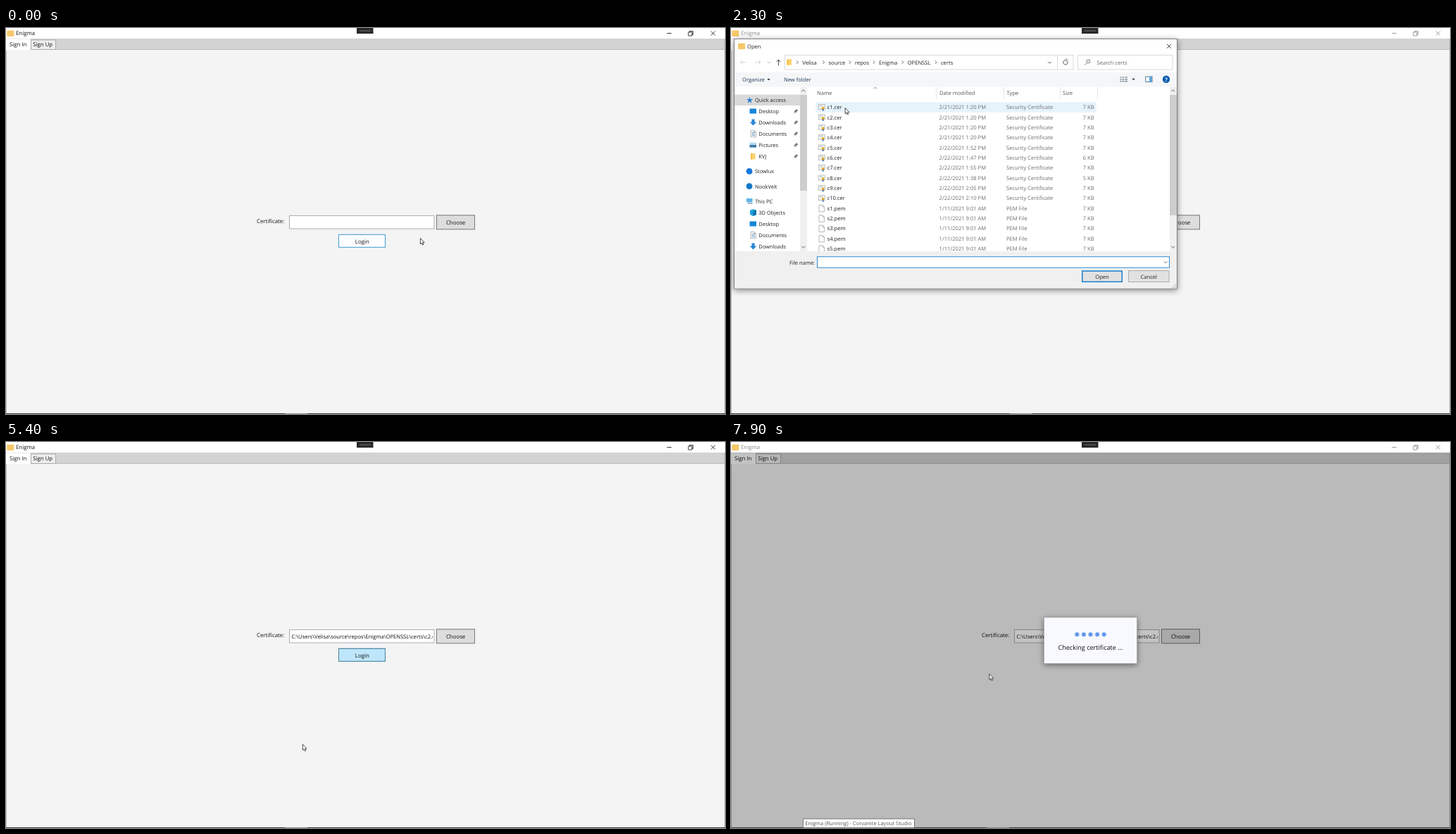
These frames come from a looping animation (1021x548 px, 8000 ms). An HTML page:

```html
<!DOCTYPE html>
<html lang="en">
<head>
<meta charset="utf-8">
<title>Enigma</title>
<style>
html, body { margin: 0; width: 100%; height: 100%; overflow: hidden; background: #f4f4f4; }
svg { display: block; width: 1021px; height: 548px; }
text { font: 7.6px 'Open Sans', 'Noto Sans', sans-serif; text-rendering: geometricPrecision; white-space: pre; fill: #222; }
.app text { font-size: 7.85px; font-weight: 500; fill: #111; }
.line { fill: none; stroke: #222; stroke-width: .9; }
.shadow { filter: drop-shadow(0 2px 4px #0007); }

.caption, .chooseHot, .dialog, .blank, .shell, .content, .hover, .picked, .path, .loginHot, .busy, .tip, .dots, .cursor, .active {
  animation: 8s step-end infinite;
}
.caption { animation-name: caption; }
.chooseHot { animation-name: chooseHot; }
.dialog { animation-name: dialog; }
.blank { animation-name: blank; }
.shell { animation-name: shell; }
.content { animation-name: content; }
.hover { animation-name: hover; }
.picked { animation-name: picked; }
.path { animation-name: path; }
.loginHot { animation-name: loginHot; }
.busy { animation-name: busy; }
.tip { animation-name: tip; }
.active { animation-name: active; }
.dots { animation-name: dots; fill: none; stroke: #5f97ea; stroke-width: 6; stroke-linecap: round; }
.cursor { animation-name: cursor; animation-timing-function: linear; }

@keyframes caption { 0% { opacity: 1 } 10.5% { opacity: .5 } 50% { opacity: 1 } 77.4% { opacity: .5 } }
@keyframes chooseHot { 0% { opacity: 0 } 3.7% { opacity: 1 } 12.4% { opacity: 0 } }
@keyframes dialog { 0% { opacity: 0 } 12.4% { opacity: 1 } 50% { opacity: 0 } }
@keyframes blank { 0% { opacity: 1 } 21.2% { opacity: 0 } }
@keyframes shell { 0% { opacity: 0 } 21.2% { opacity: 1 } }
@keyframes content { 0% { opacity: 0 } 23.7% { opacity: 1 } }
@keyframes hover { 0% { opacity: 0 } 26.2% { opacity: 1 } 35% { opacity: 0 } }
@keyframes picked { 0% { opacity: 0 } 38.7% { opacity: 1 } }
@keyframes path { 0% { opacity: 0 } 50% { opacity: 1 } }
@keyframes loginHot { 0% { opacity: 0 } 60% { opacity: 1 } 68.5% { opacity: 0 } }
@keyframes busy { 0% { opacity: 0 } 68.5% { opacity: 1 } }
@keyframes tip { 0% { opacity: 0 } 83.7% { opacity: 1 } }
@keyframes active { 0% { transform: none } 77.4% { transform: translateX(-33px) } }
@keyframes dots {
  0% { transform: translateX(0); stroke-dasharray: 0 99 }
  74.8% { transform: translateX(-4.8px); stroke-dasharray: 0 9.6 0 99 }
  81% { transform: translateX(-9.6px); stroke-dasharray: 0 9.6 0 9.6 0 99 }
  87.3% { transform: translateX(-14.4px); stroke-dasharray: 0 9.6 0 9.6 0 9.6 0 99 }
  93.5% { transform: translateX(-19.2px); stroke-dasharray: 0 9.6 }
}
@keyframes cursor {
  0%, 1.25% { transform: translate(588px, 298px) }
  6.25% { transform: translate(636px, 274px) }
  12.5% { transform: translate(637px, 274px) }
  17.5% { transform: translate(440.7px, 233px) }
  23.75% { transform: translate(210px, 135px) }
  28.75% { transform: translate(161.7px, 113px) }
  33.75% { transform: translate(160px, 115px) }
  38.75%, 48.75% { transform: translate(151.5px, 125px) }
  56.25% { transform: translate(364px, 274px) }
  58.75% { transform: translate(600px, 296px) }
  61.25% { transform: translate(512px, 300px) }
  63.75% { transform: translate(506px, 302px) }
  67.5% { transform: translate(422px, 428px) }
  68.75% { transform: translate(305.2px, 499px) }
  73.75% { transform: translate(185px, 552px) }
  93.75% { transform: translate(181px, 552px) }
  98.75%, 100% { transform: translate(366.5px, 328.7px) }
}
</style>
</head>
<body>
<svg id="stage" viewBox="0 0 1021 548"></svg>
<script>
const rect = (x, y, w, h, fill, more = '') =>
  `<rect x="${x}" y="${y}" width="${w}" height="${h}" fill="${fill}" ${more}/>`;
const box = (x, y, w, h, fill, edge, weight = 1) =>
  rect(x, y, w, h, fill, `stroke="${edge}" stroke-width="${weight}"`);
const line = (d, color = '#222', weight = .9) =>
  `<path class="line" d="${d}" style="stroke:${color};stroke-width:${weight}"/>`;
const disc = (x, y, r, fill) => `<circle cx="${x}" cy="${y}" r="${r}" fill="${fill}"/>`;
// y is the middle of the capitals
const text = (x, y, s, style = '', anchor = 'start') =>
  `<text x="${x}" y="${y + 2.8}" text-anchor="${anchor}" style="${style}">${s}</text>`;
const group = (name, ...parts) => `<g class="${name}">${parts.join('')}</g>`;
const list = (items, draw) => items.map(draw).join('');
const chevron = (x, y, dx, dy, color = '#555') => dx
  ? line(`M${x - dx / 2} ${y - 2.2}l${dx} 2.2l${-dx} 2.2`, color)
  : line(`M${x - 2.4} ${y - dy / 2}l2.4 ${dy}l2.4 ${-dy}`, color);
const arrowDown = (x, y) => `<path d="M${x - 2.2} ${y - 1}h4.4l-2.2 2.4z" fill="#333"/>`;
const cross = (x, y) => line(`M${x - 3} ${y - 3}l6 6m0-6l-6 6`);
const page = (x, y) =>
  line(`M${x} ${y - 4.6}h5l2.4 2.4v7h-7.4zm5 0v2.4h2.4`, '#999', .7);
const folder = (x, y) => rect(x, y - 4, 6.5, 8.5, '#ffd56f') + rect(x, y - 4, 2, 8.5, '#f3bd4a');
const pin = (x, y) => `<path d="M${x + .5} ${y - 3.5}l3 3l-1.2.3l-1.7 1.7l-.2 1.6l-1.4-1.4l-2.5 2.5l2-3l-1.4-1.4l1.6-.2l1.7-1.7z" fill="#777"/>`;
const appIcon = (x, y) => rect(x, y, 10, 8.4, '#f5c868');

// main window
const caption = group('caption',
  text(14, 7.6, 'Enigma'),
  line('M938.5 7.5h6.5'),
  line('M969 6h5v5h-5zM970.5 6v-1.5h5v5h-1.5'),
  cross(1004, 7.5));

const app = group('app',
  rect(0, 0, 1021, 548, '#f4f4f4'),
  rect(0, 0, 1021, 15, '#fff'),
  rect(0, 15, 1021, 15.5, '#d3d3d3'),
  line('M.5 15V548M1020.5 15V548M0 30.5H1021', '#b5b5b5', .9),
  rect(0, 15.5, 35, 16, '#fff'),
  box(35.5, 17, 35, 13.5, '#eee', '#acacac'),
  text(5, 23.2, 'Sign In'), text(38.2, 23.6, 'Sign Up'),
  appIcon(1.3, 3.5), caption,
  rect(498, 0, 23.5, 8, '#282828'), rect(502, 3, 16, 2, '#4c4c4c'),
  text(356, 274.6, 'Certificate:'),
  box(402.5, 266.5, 205.5, 18.5, '#fff', '#abadb3'),
  `<clipPath id="field"><rect x="403" y="267" width="203" height="18"/></clipPath>`,
  group('path', `<g clip-path="url(#field)">${text(405.5, 276, 'C:\\Users\\Velisa\\source\\repos\\Enigma\\OPENSSL\\certs\\c2.cer', 'font-size:7.6px')}</g>`),
  box(611.5, 265.8, 54, 20, '#ddd', '#777'),
  group('chooseHot', box(611.5, 265.8, 54, 20, '#bee6fd', '#3c7fb1')),
  text(638.6, 276.2, 'Choose', '', 'middle'),
  box(472.5, 293.3, 66, 18, '#fff', '#3d98cf'),
  group('loginHot', box(472.5, 293.3, 66, 18, '#bee6fb', '#4a8099')),
  text(505.8, 302.8, 'Login', '', 'middle'));

// file dialog
const navRows = ['Desktop', 'Downloads', 'Documents', 'Pictures', 'KVJ'];
const navY = i => 118 + 16 * i;
const blue = '#2b83d6';
const navIcon = {
  Desktop: y => rect(26.5, y - 3.5, 9.5, 7, '#1687d9'),
  Downloads: y => `<path d="M29.5 ${y - 4.5}h4v4h2.8l-4.8 5l-4.8-5h2.8z" fill="${blue}"/>`,
  Documents: y => page(28, y) + line(`M29.5 ${y - 1.5}h4.5m-4.5 2h4.5m-4.5 2h4.5`, '#4c86b5', .8),
  Pictures: y => rect(26.5, y - 3.5, 9.5, 7, '#b9d9ee') + rect(26.5, y, 9.5, 3.5, '#3c78a6'),
  '3D Objects': y => `<path d="M27 ${y - 3.5}l4.5-1.2l4.5 1.2v6.5l-4.5 2l-4.5-2z" fill="#23a3dc"/><path d="M31.5 ${y - 2}l4.5-1.5v6.5l-4.5 2z" fill="#1173ad"/>`,
  KVJ: y => folder(28, y),
};
const navItem = (s, y) => navIcon[s](y) + text(39.3, y, s, 'font-size:7.45px');

const blank = group('blank',
  rect(5, 94.5, 103.5, 15.5, '#d9d9d9'),
  list(navRows, (s, i) => page(28, navY(i)) + pin(103, navY(i)) + text(39.3, navY(i), s, 'font-size:7.45px')),
  text(34, 267.3, 'Network', 'font-size:7.45px'),
  rect(623, 95, 10, 171, '#cdcdcd'), rect(623, 266, 10, 39, '#f0f0f0'),
  rect(5, 317, 628, 52.5, '#f0f0f0'),
  rect(623, 358, 10, 11.5, '#fff'),
  rect(83, 327, 36.5, 10.5, '#fff'), rect(122.5, 324.5, 500, 16, '#fff'),
  rect(498, 344, 58.5, 17.5, '#fff'), rect(564, 344, 58.5, 17.5, '#fff'));

const grip = list([0, 1, 2, 3, 4, 5], i => {
  const [c, r] = [[2, 0], [1, 1], [2, 1], [0, 2], [1, 2], [2, 2]][i];
  return rect(626.5 + 2.2 * c, 363.3 + 2.2 * r, 1.2, 1.2, '#aaa');
});
const scrollbar = (x, end) =>
  rect(x, 84, 10, 233, '#f0f0f0') + rect(x, 95, 10, end - 95, '#cdcdcd') +
  chevron(x + 4.8, 89, 0, -2.6) + chevron(x + 4.8, 311, 0, 2.6);

const shell = group('shell',
  rect(5, 94.5, 93, 15.5, '#d9d9d9'),
  rect(5, 63, 628, 20.5, '#f5f6f7'),
  scrollbar(98, 231), scrollbar(623, 266),
  rect(5, 317, 628, 52.5, '#f0f0f0'), grip);

const crumbs = [['Velisa', 101.3], ['source', 138.5], ['repos', 176], ['Enigma', 210], ['OPENSSL', 250.7], ['certs', 298]];
const navy = 'fill:#1e395b';
const toolbar =
  line('M21.5 48.8h-8m3.2-3l-3.2 3l3.2 3M34 48.8h8m-3.2-3l3.2 3l-3.2 3', '#ccc') +
  chevron(54, 49, 0, 1.8, '#bbb') +
  line('M67.5 53v-8m-2.8 3l2.8-3l2.8 3', '#444', 1) +
  box(76.5, 38.5, 409.5, 20.5, '#fff', '#d9d9d9') + line('M463.5 38.5v20.5', '#d9d9d9') +
  folder(79.5, 48.3) +
  list(crumbs, ([s, x]) => chevron(x - 7, 48.6, 2.2, 0) + text(x, 48.8, s)) +
  chevron(452.5, 49, 0, 2.6) +
  line('M477.8 47.2a3.2 3.2 0 1 1-2.5-1.6M475 43.7l2.6 1.8l-2 2.2', '#444') +
  box(492.5, 38.5, 134.5, 20.5, '#fff', '#d9d9d9') +
  line('M505.5 49.5l-3 3M505 47.3a2.4 2.4 0 1 0 4.8 0a2.4 2.4 0 1 0-4.8 0', '#667') +
  text(519.5, 48.8, 'Search certs', 'fill:#666') +
  text(16, 73, 'Organize', navy) + arrowDown(53.5, 73) + text(75, 73, 'New folder', navy) +
  list([70, 72.8, 75.6], y => line(`M552.5 ${y}h2m1.3 0h2.4m1.2 0h3.5`, '#567', 1.2)) + arrowDown(571.5, 72.8) +
  box(588.8, 69, 9.2, 7.5, '#fff', '#456a8a', .9) + rect(594, 69, 4, 7.5, '#5ea7dc') +
  disc(618, 72.8, 5.2, '#0b5cb0') + text(618, 72.8, '?', 'fill:#fff;font-weight:700', 'middle');

const tree =
  `<path d="M26.5 98l1.2 3.1l3.3.2l-2.6 2l.9 3.3l-2.8-1.8l-2.8 1.8l.9-3.3l-2.6-2l3.3-.2z" fill="#2c86d1"/>` +
  list(navRows, (s, i) => navItem(s, navY(i)) + pin(92, navY(i))) +
  disc(26, 203.3, 4.4, '#1477dc') + disc(26, 224.7, 4.4, '#1477c8') +
  rect(22, 242, 8.5, 5.5, '#5db4e4') + rect(24, 248.5, 6.5, 1.2, '#789') +
  list(['3D Objects', 'Desktop', 'Documents', 'Downloads'], (s, i) => navItem(s, 262 + 16 * i));

const times = ['1:52', '1:47', '1:55', '1:38', '2:05', '2:10'];
const rowY = i => 112.6 + 14.34 * i;
const certIcon = y =>
  box(124.5, y - 4, 8.7, 7, '#f5f5ee', '#aaa', .7) + line(`M126 ${y - 2}h4`, '#8ab', .8) +
  disc(130.7, y + 1.2, 1.9, '#e0a21c') + rect(129.8, y + 2.6, 1.8, 2.4, '#3a68b0');
const row = i => {
  const y = rowY(i), cert = i < 10, dim = 'fill:#6d6d6d';
  const date = !cert ? '1/11/2021 9:01 AM' : i < 4 ? '2/21/2021 1:20 PM' : `2/22/2021 ${times[i - 4]} PM`;
  return (cert ? certIcon(y) : page(125, y)) +
    text(136.6, y, cert ? `c${i + 1}.cer` : `s${i - 9}.pem`) +
    text(295.6, y, date, dim) +
    text(391, y, cert ? 'Security Certificate' : 'PEM File', dim) +
    text(515.6, y, `${{ 5: 6, 7: 5 }[i] || 7} KB`, dim, 'end');
};
const files =
  list([['Name', 122], ['Date modified', 296], ['Type', 391.5], ['Size', 471]], ([s, x]) => text(x, 92.3, s, 'fill:#555')) +
  line('M291.5 84v17M387.5 84v17M467.5 84v17M520.5 84v17', '#e3e3e3') +
  chevron(205, 85.2, 0, -2, '#888') +
  group('hover', rect(120.5, 105.3, 398, 14.4, '#e5f3fb')) +
  group('picked', box(121, 119.9, 397.2, 13.8, '#c2e6fb', '#92cdf0', .9)) +
  `<clipPath id="rows"><rect x="109" y="102" width="514" height="214.5"/></clipPath>` +
  `<g clip-path="url(#rows)">${list([...Array(15).keys()], row)}</g>`;

const footer =
  text(119.3, 332.7, 'File name:', '', 'end') +
  box(122.5, 324.7, 500, 15.5, '#fff', '#3089cf') + chevron(617, 332.5, 0, 2.4) +
  group('picked', text(124.5, 332.7, 'c2.cer')) +
  box(498.8, 345, 56.5, 15.3, '#e1e1e1', '#1c7fcb', 1.5) + text(527, 352.8, 'Open', '', 'middle') +
  box(564.5, 344.5, 57.5, 16, '#e1e1e1', '#adadad') + text(593.3, 352.8, 'Cancel', '', 'middle');

const shared =
  text(34, 102.3, 'Quick access', 'font-size:7.45px') +
  list([['Stowlux', 203.3], ['NookVelt', 224.7], ['This PC', 246]], ([s, y]) => text(34, y, s, 'font-size:7.45px'));

const dialog = group('dialog',
  rect(4.5, 15.5, 629, 354.5, '#fff', 'class="shadow" stroke="#808080"'),
  appIcon(10, 21.7), text(23, 25.8, 'Open'), cross(622, 25.8),
  blank, shell, shared, group('content', toolbar, tree, files, footer));

// busy overlay
const busy = group('busy',
  rect(0, 15, 1021, 533, '#000', 'opacity=".237"'),
  rect(444.5, 249, 132, 65.5, '#f8f8ff', 'class="shadow" stroke="#999" stroke-width=".6"'),
  '<path class="dots" d="M510.5 273.2h39"/>',
  text(510.5, 292.5, 'Checking certificate ...', 'font-size:9.1px;font-weight:500;fill:#111', 'middle'));

const edge = rect(0, 547, 1021, 1, '#3a3a3a') + group('active', rect(396, 547, 32, 1, '#888'));
const tip = group('tip',
  box(102.5, 535, 158, 12.5, '#fff', '#777'),
  text(105.3, 541.3, 'Enigma (Running) - Corvanite Layout Studio', 'font-size:7.5px;fill:#575757'));
const cursor = group('cursor',
  '<path d="M.4.4V8.8L2.3 7.1L3.6 10L4.9 9.4L3.7 6.6H6.2Z" fill="#fff" stroke="#222" stroke-width=".8"/>');

document.getElementById('stage').innerHTML = app + dialog + busy + edge + tip + cursor;
</script>
</body>
</html>
```
